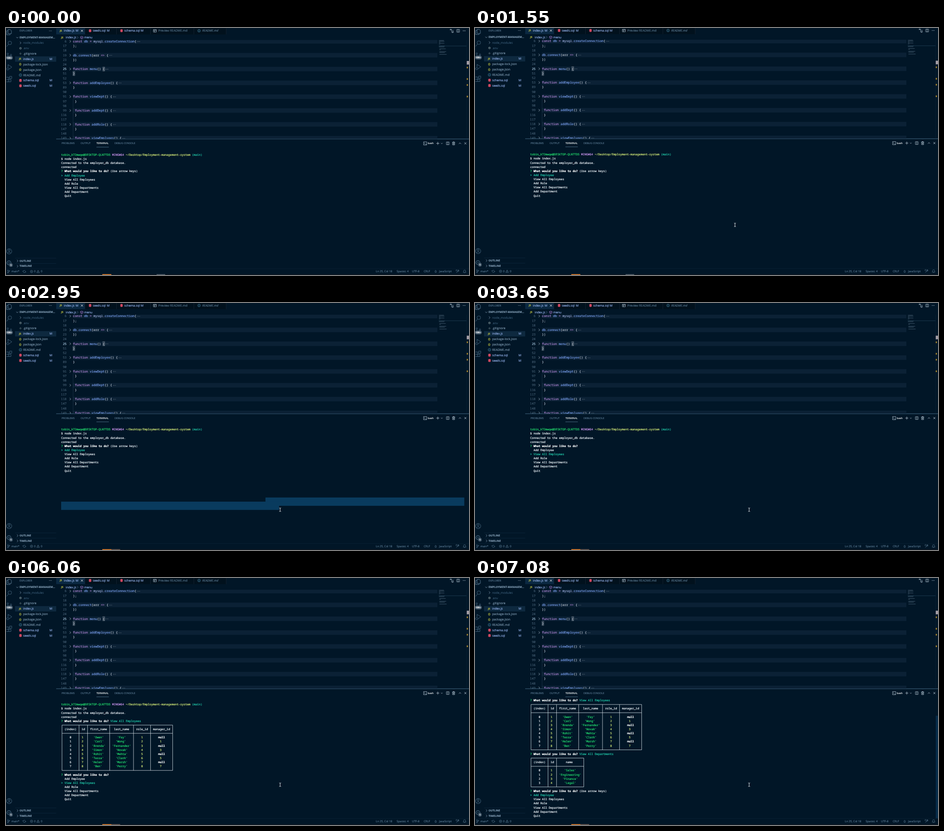
Animation, 1024 px wide and 547 px high, one loop 8000 ms. Source, as an HTML page:

```html
<!DOCTYPE html>
<html lang="en">
<head>
<meta charset="utf-8">
<title>Employee tracker in the terminal</title>
<style>
  html, body { margin: 0; width: 100%; height: 100%; overflow: hidden; background: #011627; }
  svg { display: block; width: 100vw; height: 100vh; }
  text { white-space: pre; text-rendering: geometricPrecision; }
  .ui { font-family: "Open Sans", "Noto Sans", sans-serif; stroke-width: .12; }
  .mono { font-family: "Noto Sans Mono", "DejaVu Sans Mono", monospace; stroke-width: .12; }
  #term .mono { stroke-width: .24; }
</style>
</head>
<body>
<svg viewBox="0 0 1024 547" preserveAspectRatio="none">
  <defs><clipPath id="pane"><rect x="111" y="26" width="913" height="219"/></clipPath></defs>
  <rect width="1024" height="547" fill="#011627"/>
  <g id="app">
    <g id="frame"></g>
    <g id="code" clip-path="url(#pane)"></g>
    <g id="term"></g>
  </g>
  <g id="bar"></g>
  <path id="mouse" d="M-2-4Q0-4 0-3Q0-4 2-4M0-3V3M-2 4Q0 4 0 3Q0 4 2 4" fill="none" stroke="#e4e7ea" stroke-width="1"/>
</svg>
<script>
const LOOP = 8000;
const C = {
  dim: '#5f7e97', faint: '#395a75', side: '#89a4bb', mod: '#a2bffc', text: '#d6deeb', white: '#fff',
  out: '#eaeff4', icon: '#b4c4d2', purple: '#c792ea', blue: '#82aaff', green: '#22da6e', cyan: '#21c7a8',
  yellow: '#d3e878', red: '#f0516b', js: '#cbcb41', num: '#4b6479'
};
const el = id => document.getElementById(id);
const esc = s => s.replace(/&/g, '&amp;').replace(/</g, '&lt;').replace(/>/g, '&gt;');

// ---- drawing helpers ----
const rect = (x, y, w, h, fill, extra = '') =>
  `<rect x="${x}" y="${y}" width="${w}" height="${h}" fill="${fill}" ${extra}/>`;
const path = (d, color, w = .8, fill = 'none') =>
  `<path d="${d}" fill="${fill}" stroke="${color}" stroke-width="${w}"/>`;
const ring = (x, y, r, color, w = .8) =>
  `<circle cx="${x}" cy="${y}" r="${r}" fill="none" stroke="${color}" stroke-width="${w}"/>`;
const dot = (x, y, r, color) => `<circle cx="${x}" cy="${y}" r="${r}" fill="${color}"/>`;
const dots = (x, y, step, color, r = .55) => [0, 1, 2].map(i => dot(x + i * step, y, r, color)).join('');
const ink = color => `fill="${color}" stroke="${color}"`;
const ui = (s, x, cy, color, size = 6.65, extra = '') =>
  `<text class="ui" x="${x}" y="${cy + size * .345}" font-size="${size}" ${ink(color)} ${extra}>${esc(s)}</text>`;
const bold = 'font-weight="700"';
const right = (x, y, color) => path(`M${x - 1.3} ${y - 2.5}l2.6 2.5l-2.6 2.5`, color);
const down = (x, y, color) => path(`M${x - 2.4} ${y - 1.2}l2.4 2.4l2.4-2.4`, color);
const cross = (x, y, color) => path(`M${x - 2.2} ${y - 2.2}l4.4 4.4m0-4.4l-4.4 4.4`, color, .9);
const split = (x, y, color) => path(`M${x - 3} ${y - 3}h6v6h-6zM${x} ${y - 3}v6`, color);
const info = (x, y) => ring(x, y, 2.9, '#519aba', .7) + path(`M${x} ${y - .5}v2M${x} ${y - 1.8}v.8`, '#519aba', .8);
const db = (x, y) => rect(x - 2.6, y - 2, 5.2, 4, C.red) +
  [-2, 2].map(d => `<ellipse cx="${x}" cy="${y + d}" rx="2.6" ry="1.15" fill="${C.red}"/>`).join('') +
  [-.9, 1.1].map(d => path(`M${x - 2.6} ${y + d}q2.6 1 5.2 0`, '#4a2233', .4)).join('');
const js = (x, y) => ui('JS', x, y, C.js, 5.4, bold);
const braces = (x, y, color) => ui('{}', x, y - .2, color, 6.2, bold);

// ---- window furniture ----
function tabs() {
  const edge = [174.5, 244.5, 319.5, 415.5, 487];
  return rect(111, 0, 376, 13.6, '#01111d') + rect(111, 0, 63.5, 13.6, '#0b2942') +
    edge.map(x => path(`M${x} 0V13.6`, '#1b2838', .7)).join('') +
    js(119, 5.6) + ui('index.js', 128, 5.5, C.mod) + ui('M', 154, 5.5, C.mod) + cross(168, 5.6, C.white) +
    db(186, 5.5) + ui('seeds.sql', 192, 5.5, C.mod) + ui('M', 223, 5.5, C.mod) +
    db(255.5, 5.5) + ui('schema.sql', 261.5, 5.5, C.mod) + ui('M', 298, 5.5, C.mod) +
    path('M326 2.8h6.5v5.6h-6.5zM326 4.6h6.5M328.5 4.6v3.8', C.icon) + ui('Preview README.md', 337, 5.5, C.dim) +
    info(427, 5.5) + ui('README.md', 434, 5.5, C.dim, 6.65, 'font-style="italic"') +
    path('M983 2.5h2.5v4.5M985.5 9v-2M988.5 9.5h-2.5M988.5 8v-4', C.icon) +
    ring(983, 3, 1, C.icon) + ring(988.5, 8.5, 1, C.icon) +
    split(1000, 5.6, C.icon) + dots(1011, 5.6, 2.3, C.icon, .7) +
    js(122, 20.6) + ui('index.js', 132, 20.5, C.mod) + right(158.5, 20.5, C.dim) +
    path('M167.5 17.6l2.9 1.5v3.2l-2.9 1.5l-2.9-1.5v-3.2zM164.6 19.1l2.9 1.5l2.9-1.5M167.5 20.6v3.2', '#b180d7', .7) +
    ui('menu', 173, 20.5, C.mod);
}

function activity() {
  const c = '#48687f';
  return path('M4.5 3h5l2.5 2.5v6.5h-7.5zM4.5 5.5h-3v9h7.5v-2.5', C.dim, .9) +
    ring(8.5, 32.5, 3.9, c, .9) + path('M5.7 35.5L1.5 40.5', c, .9) +
    ring(4, 56.5, 1.6, c) + ring(11, 59, 1.6, c) + path('M4 58v6M11 60.6q-.5 3-7 3', c) +
    rect(0, 61, 15, 8.6, '#44596b', 'rx="4.3"') + ui('10K+', 1.6, 65.3, C.white, 5, bold) +
    path('M4.5 80.5l8.5 5.5l-7 4.8M4.5 80.5v6', c, .9) + ring(4, 90, 2.4, c) +
    path('M1 108.5h5v10h-5M1 113.5h10v5h-5M8 106.5h4.8v4.8h-4.8z', c, .9) +
    ring(7, 494, 5.8, c, .9) + ring(7, 492, 2, c, .9) + path('M3 498q4-4.5 8 0', c, .9) +
    ring(6.5, 519.5, 4.4, c, 1.3) + ring(6.5, 519.5, 1.5, c) +
    dot(11, 524.3, 4, '#44596b') + ui('1', 9.6, 524.3, C.white, 5, bold);
}

function sidebar() {
  const files = [
    ['node_modules', C.faint, (x, y) => right(x, y, C.side)],
    ['.env', C.faint, (x, y) => ring(x, y, 1.8, '#6d8086', 1.3)],
    ['.gitignore', C.side, (x, y) => path(`M${x} ${y - 2.2}l2.2 2.2l-2.2 2.2l-2.2-2.2z`, '#41535b', .8, '#2c4150')],
    ['index.js', C.mod, (x, y) => js(x - 3.2, y)],
    ['package-lock.json', C.side, (x, y) => braces(x - 3, y, C.js)],
    ['package.json', C.side, (x, y) => braces(x - 3, y, C.js)],
    ['README.md', C.side, info],
    ['schema.sql', C.mod, db],
    ['seeds.sql', C.mod, db]
  ];
  let out = ui('EXPLORER', 30, 5.6, C.dim, 5.8) + dots(96, 5.6, 2.3, C.icon) +
    down(25, 20.5, C.side) + ui('EMPLOYMENT-MANAGEM...', 30, 20.3, C.side, 5.85, bold) +
    rect(20, 62.2, 91, 11.9, '#0e293f');
  files.forEach(([name, color, icon], i) => {
    const y = 32.4 + 11.88 * i;
    out += icon(32, y) + ui(name, 38, y, color);
    if (color === C.mod) out += ui('M', 96.2, y, color);
  });
  [['OUTLINE', 515.2], ['TIMELINE', 526.9]].forEach(([s, y]) => {
    out += path(`M20 ${y - 6}H111`, '#0f2a3f', .7) + right(25.5, y, C.side) + ui(s, 30, y, C.side, 5.8, bold);
  });
  return out;
}

function panel() {
  const y = 254.9, s = 5.6, c = C.icon;
  return path('M111 245.2H1024', '#4d738f', .9) +
    ui('PROBLEMS', 123, y, C.dim, s) + ui('OUTPUT', 165, y, C.dim, s) +
    ui('TERMINAL', 200, y, C.white, s) + ui('DEBUG CONSOLE', 240, y, C.dim, s) +
    path('M200 263.2H227.5', C.dim, .8) +
    path('M923.5 251.5h7v7h-7zM925 253.3l1.8 1.7l-1.8 1.7M927.5 257h2', c) + ui('bash', 933, y, C.white, s) +
    path(`M955 ${y - 3.3}v6.6M951.7 ${y}h6.6`, c, .9) + path(`M962 ${y - .8}l1.8 1.8l1.8-1.8`, c) +
    split(977, y, c) +
    path('M986.8 252.5h6.4M989 252.5v-1h2v1M987.8 252.5v5.8h4.4v-5.8M989.3 254v3M990.7 254v3', c, .9) +
    path(`M1001.6 ${y + 1.2}l2.4-2.4l2.4 2.4`, c, .9) + cross(1016, y, c);
}

function status() {
  const y = 538.7, s = 6.1, c = C.dim;
  return path('M0 532.6H1024', '#0c2438', .7) +
    ring(4.3, 536.2, .9, c, .7) + ring(4.3, 541.2, .9, c, .7) + ring(7.5, 537.2, .9, c, .7) +
    path('M4.3 537v3.3M7.5 538q0 1.5-3.2 2', c, .7) + ui('main*', 12, y, c, s) +
    path('M37.5 538.5a3 2.5 0 0 1 5.5-1M43.5 539a3 2.5 0 0 1-5.5 1M36.5 537.5l1 1.3l1.5-.8M44.5 540l-1-1.3l-1.5.8', c, .7) +
    ring(56.5, y, 2.7, c, .7) + path('M55.4 537.6l2.2 2.2m0-2.2l-2.2 2.2', c, .7) + ui('0', 62, y, c, s) +
    path('M71 535.8l3 5.4h-6zM71 537.8v1.7', c, .7) + ui('0', 77, y, c, s) +
    ui('Ln 25, Col 18', 818, y, c, s) + ui('Spaces: 4', 864, y, c, s) + ui('UTF-8', 898, y, c, s) +
    ui('CRLF', 924, y, c, s) + ui('{}', 948, y, c, s) + ui('JavaScript', 958, y, c, s) +
    ring(999.5, 537, 1.3, c, .7) + path('M996 541.5q1-3 4-2.5M997.5 535h-2v3M1001.5 538.5v-3h-2', c, .7) +
    path('M1011 540.5h6.5l-1-1.5v-1.5a2.25 2.25 0 0 0-4.5 0v1.5zM1013.5 541.5h1.5', c, .7);
}

// ---- editor ----
const EW = 4.13, EX = 148;
const spans = (segs, base) => segs.map(([s, color = base, b]) =>
  `<tspan ${ink(color)}${b ? ' font-weight="700"' : ''}>${esc(s)}</tspan>`).join('');
const fn = (name, pad = '') => [[pad + 'function ', C.purple], [name, C.blue], ['() {']];
const close = s => [[s]];

function editor() {
  const rows = [
    [6, [['const ', C.purple], ['db ', C.blue], ['= ', C.purple], ['mysql', '#a9b8e8'], ['.', C.purple], ['createConnection', C.blue], ['(']], 1],
    [17, close(');')], [18],
    [19, [['db', C.blue], ['.', C.purple], ['connect', C.blue], ['(err '], ['=>', C.purple], [' {']], 1],
    [23, close('})')], [24],
    [25, fn('menu'), 1], [51, close('}')], [52],
    [53, fn('addEmployee'), 1], [89, close('}')], [90],
    [91, fn('viewDept'), 1], [97, close(' }')], [98],
    [99, fn('addDept', ' '), 1], [116, close(' }')], [117],
    [118, fn('addRole', ' '), 1], [147, close(' }')], [148],
    [149, fn('viewEmplyees', ' '), 1]
  ];
  const size = EW / .6;
  let out = '';
  rows.forEach(([n, segs, fold], i) => {
    const y = 29 + 10.21 * i, base = y + 2.3;
    if (fold) out += rect(EX, y - 5, 806, 10, '#0b2135') + right(142, y, C.icon);
    if (n === 25 || n === 51) {
      out += rect(n === 25 ? EX + 16 * EW : EX, y - 4.6, EW, 9.2, '#28394a', 'stroke="#7c8b98" stroke-width=".6"');
    }
    out += `<text class="mono" x="134" y="${base}" font-size="${size}" text-anchor="end" ${ink(n === 25 ? '#c5e4fd' : C.num)}>${n}</text>`;
    if (!segs) return;
    out += `<text class="mono" x="${EX}" y="${base}" font-size="${size}">${spans(segs, C.text)}</text>`;
    const len = segs.reduce((sum, s) => sum + s[0].length, 0);
    if (fold) out += dots(EX + len * EW + 2.6, y + .3, 2.4, '#8a97a3', .55);
  });
  out += path('M148.3 157V245', '#2a4055', .6);
  // minimap and ruler
  for (let i = 0; i < 16; i++) {
    if (i % 3 !== 2 || i < 4) {
      out += rect(i > 8 ? 958.5 : 957.5, 26.6 + i * 2.05, i % 3 ? 3 + i % 2 * 9 : 11 + (i * 7) % 10, .8, '#647d92', 'opacity=".75"');
    }
  }
  out += path('M957 39.3H1019', '#234459', .8) + path('M1018.6 26V245', '#0c2438', .6);
  out += rect(1019, 72.4, 5, 8, '#a39da6');
  [87, 112.4, 125.6, 151.2].forEach(y => { out += rect(1019, y - 1.8, 2.6, 3.6, '#a9852b'); });
  return out;
}

// ---- terminal ----
const TW = 3.765, TH = 9.13, TX = 122, TY = 280.1;
const MENU = ['Add Employee', 'View All Employees', 'Add Role', 'View All Departments', 'Add Department', 'Quit'];
const rowY = r => TY + TH * r;
const line = (r, segs, col = 0) =>
  `<text class="mono" x="${TX + col * TW}" y="${rowY(r) + 2.2}" font-size="${TW / .6}">${spans(segs, C.out)}</text>`;

function prompt(r, tail = '', color) {
  return line(r, [['? ', C.green], ['What would you like to do?', C.white, 1], [' ' + tail, color]]);
}
const ask = r => prompt(r, '(Use arrow keys)');
const menu = (r, pick) => MENU.map((s, i) =>
  line(r + i, [i === pick ? ['> ' + s, C.cyan] : ['  ' + s]])).join('');

function table(r, heads, rows) {
  const widths = heads.map((h, i) => Math.max(h.length, ...rows.map(row => row[i].length)) + 2);
  const edges = [0];
  widths.forEach(w => edges.push(edges[edges.length - 1] + w + 1));
  const px = c => TX + (c + .5) * TW;
  const top = rowY(r), end = rowY(r + rows.length + 3);
  let d = edges.map(c => `M${px(c)} ${top}V${end}`).join('');
  [top, rowY(r + 2), end].forEach(y => { d += `M${px(0)} ${y}H${px(edges[edges.length - 1])}`; });
  const cell = (s, i, row, style) =>
    line(row, [[s, ...style]], edges[i] + 1 + Math.floor((widths[i] - s.length) / 2));
  const style = (s, i) => s === 'null' ? [C.white, 1] : [i === 0 ? C.out : s[0] === "'" ? C.green : C.yellow];
  return path(d, '#d5dce3', .85) + heads.map((h, i) => cell(h, i, r + 1, [C.out])).join('') +
    rows.map((row, k) => row.map((s, i) => cell(s, i, r + 3 + k, style(s, i))).join('')).join('');
}

const quote = s => `'${s}'`;
const PEOPLE = 'Owen Fay,Carl Wong,Brenda Fernandez,Simon Novak,Rohit Mehta,Tessa Clark,Helen Marsh,Ben Perry'.split(',');
const staff = r => table(r, ['(index)', 'id', 'first_name', 'last_name', 'role_id', 'manager_id'],
  PEOPLE.map((p, i) => [`${i}`, `${i + 1}`, ...p.split(' ').map(quote), `${i + 1}`, i % 2 ? `${i}` : 'null']));
const depts = r => table(r, ['(index)', 'id', 'name'],
  ['Sales', 'Engineering', 'Finance', 'Legal'].map((s, i) => [`${i}`, `${i + 1}`, quote(s)]));

const intro = () =>
  line(0, [['tobin_k72mwqe@DESKTOP-QLN7TD5 ', C.green], ['MINGW64 ', C.purple],
    ['~/Desktop/Employment-management-system ', C.yellow], ['(main)', C.cyan]]) +
  line(1, [['$ node index.js']]) + line(2, [['Connected to the employer_db database.']]) + line(3, [['connected']]);
const listed = r => prompt(r, MENU[1], C.cyan) + staff(r + 1);

const SCREENS = [
  [0, () => intro() + ask(4) + menu(5, 0)],
  [3650, () => intro() + prompt(4) + menu(5, 1)],
  [4580, () => intro() + listed(4) + ask(17) + menu(18, 0)],
  [6060, () => intro() + listed(4) + prompt(17) + menu(18, 1)],
  [6290, () => intro() + listed(4) + prompt(17) + menu(18, 2)],
  [6530, () => intro() + listed(4) + prompt(17) + menu(18, 3)],
  [7080, () => listed(-1) + prompt(12, MENU[3], C.cyan) + depts(13) + ask(21) + menu(22, 0) +
    rect(1019, 305, 5, 227, '#062b48')]
];

// ---- pointer and drag selection ----
const steps = (t, from, to, n) => Math.min(n - 1, Math.floor((t - from) / (to - from) * (n - 1) + 1e-6));

function pointer(t) {
  if (t < 150) return null;
  if (t < 2790) {
    const p = 1 - (1 - steps(t, 150, 540, 6) / 5) ** 2;
    return [805 - 230 * p, 494 - 58 * p];
  }
  const p = (steps(t, 2790, 2950, 3) + 1) / 3;
  return [575 + 31.3 * p, 436 + 21.8 * p];
}

function selection(t, [x, y]) {
  if (t < 2790 || t >= 3650) return '';
  const r0 = 17, r1 = Math.floor((y - TY) / TH + .5), left = TX + 120 * TW, end = 1013.6;
  const stop = TX + Math.floor((x - TX) / TW) * TW;
  let out = '';
  for (let r = r0; r <= r1; r++) {
    const a = r === r0 ? left : TX, b = r === r1 ? stop : end;
    out += rect(a, rowY(r) - TH / 2, b - a, TH + .1, '#093b5e');
  }
  return out;
}

function taskbar(hover) {
  return rect(0, 545, 1024, 2, '#0b1621') + rect(213, 545, 20, 2, '#c9732c') +
    (hover ? rect(233, 545, 19.5, 2, '#5d4f4a') : rect(333, 545, 19, 2, '#4a5560'));
}

el('frame').innerHTML = tabs() + activity() + sidebar() + panel() + status();
el('code').innerHTML = editor();
const last = {};
function put(id, html) {
  if (last[id] !== html) el(id).innerHTML = last[id] = html;
}
const views = SCREENS.map(([, draw]) => draw());

function render(t) {
  const at = pointer(t);
  const view = SCREENS.filter(([start]) => t >= start).length - 1;
  el('app').setAttribute('transform', `translate(0 ${t < 1550 ? .6 : 0})`);
  put('term', (at ? selection(t, at) : '') + views[view]);
  put('bar', taskbar(t >= 2790));
  el('mouse').setAttribute('visibility', at ? 'visible' : 'hidden');
  if (at) el('mouse').setAttribute('transform', `translate(${at[0]} ${at[1]})`);
}

const begin = performance.now();
function tick() {
  render((performance.now() - begin) % LOOP);
  requestAnimationFrame(tick);
}
tick();
</script>
</body>
</html>
```
